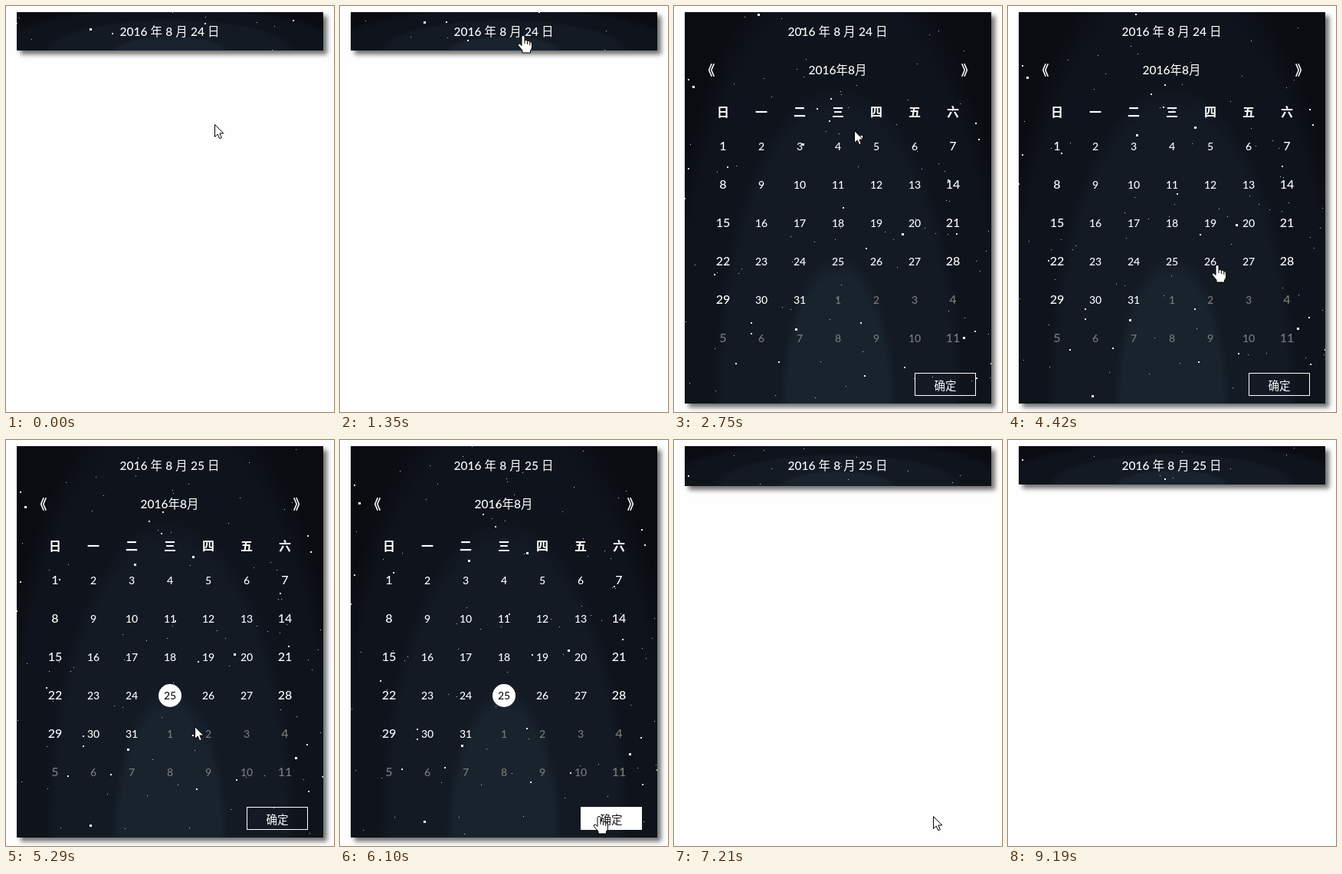
An HTML page with a canvas for the animation above (9.29 s loop, 428 by 529 pixels).

```html
<!DOCTYPE html>
<html lang="zh-CN">
<head>
<meta charset="utf-8">
<title>日历</title>
<style>
  html, body { margin: 0; width: 100%; height: 100%; overflow: hidden; background: #fefefe; }
  canvas { display: block; }
</style>
</head>
<body>
<canvas id="stage" width="428" height="529"></canvas>
<script>
const ctx = document.getElementById('stage').getContext('2d');
const LOOP = 9290;
const PANEL = { x: 14, y: 8, w: 400, closed: 50, open: 510 };
const BUTTON = { x: 314, y: 478, w: 80, h: 30 };
const OPEN_AT = 2000, PICK_AT = 4950, CLOSE_AT = 6680, SLIDE = 580;
const FAMILY = "Lato, 'Noto Sans CJK SC', 'Noto Sans CJK', sans-serif";

let seed = 11;
const random = () => (seed = seed * 16807 % 2147483647) / 2147483647;
const scatter = (count, depth) => Array.from({ length: count }, () =>
  [Math.round(PANEL.x + random() * PANEL.w), PANEL.y + random() * depth]);

// Star layers rise at different speeds (px/s); larger dots are slower.
const layers = [
  { size: 3, speed: 6.9, alpha: 1,
    dots: [[25, 124], [168, 199], [159, 440], [298, 316], [378, 451], [244, 189], [110, 30], [110, 539]] },
  { size: 2, speed: 10.9, alpha: .95, dots: scatter(28, 610) },
  { size: 1, speed: 18.2, alpha: .8, dots: scatter(105, 680) }
];

// Pointer stops: time, x, y.
const path = [
  [0, 272, 154], [1300, 240, 38], [2220, 240, 38], [2750, 235, 162], [4420, 274, 337],
  [4900, 214, 333], [6080, 339, 490], [7700, 338, 490], [8450, 352, 532]
];
const arrowShape = new Path2D('M.5 .5V16.5L4.2 13L6.7 18.7L9.3 17.6L6.9 12H11.8Z');
const handShape = new Path2D('M-2 1.5Q0-1 2 1.5V7Q4 5.5 5.5 7.7Q7.5 6.5 8.7 8.7' +
  'Q11.5 8 11.5 11V16Q11 19 9.5 20V23H-1V20L-6.5 13.5Q-7.5 10.5-4.5 11L-2 13.5Z');

// CSS "ease" timing: cubic-bezier(.25, .1, .25, 1).
function ease(x) {
  if (x <= 0) return 0;
  if (x >= 1) return 1;
  let low = 0, high = 1, s;
  for (let i = 0; i < 20; i++) {
    s = (low + high) / 2;
    if (.75 * s * (1 - s) + s ** 3 < x) low = s; else high = s;
  }
  return .3 * s * (1 - s) ** 2 + 3 * s * s * (1 - s) + s ** 3;
}

function panelHeight(t) {
  const shown = ease((t - OPEN_AT) / SLIDE) - ease((t - CLOSE_AT) / SLIDE);
  return PANEL.closed + (PANEL.open - PANEL.closed) * shown;
}

function pointerAt(t) {
  const next = path.findIndex(p => p[0] > t);
  if (next < 0) return path[path.length - 1].slice(1);
  const [t0, x0, y0] = path[next - 1], [t1, x1, y1] = path[next];
  const u = (t - t0) / (t1 - t0), k = u * u * (3 - 2 * u);
  return [Math.round(x0 + (x1 - x0) * k), Math.round(y0 + (y1 - y0) * k)];
}

const inBox = (x, y, b) => x >= b.x && x < b.x + b.w && y >= b.y && y < b.y + b.h;

function isClickable(x, y, height) {
  if (y > PANEL.y + height) return false;
  if (y < PANEL.y + PANEL.closed || inBox(x, y, BUTTON)) return true;
  const col = Math.round((x - 64) / 50), row = Math.round((y - 183) / 50);
  return col >= 0 && col < 7 && row >= 0 && row < 6 &&
    Math.hypot(x - 64 - col * 50, y - 183 - row * 50) < 15;
}

function text(str, x, y, { size = 15.5, color = '#fff', align = 'center', weight = 500, gap = 0 } = {}) {
  ctx.font = `${weight} ${size}px ${FAMILY}`;
  ctx.fillStyle = color;
  ctx.textAlign = align;
  ctx.wordSpacing = gap + 'px';
  ctx.fillText(str, x, y);
}

function drawSky(height) {
  const { x, y, w } = PANEL;
  ctx.save();
  ctx.shadowColor = '#707070';
  ctx.shadowBlur = 6;
  ctx.shadowOffsetX = ctx.shadowOffsetY = 5;
  ctx.fillStyle = '#0a0c11';
  ctx.fillRect(x, y, w, height);
  ctx.restore();

  // Banded elliptical glow that stretches with the panel.
  ctx.save();
  ctx.translate(x + w / 2, y + height);
  ctx.scale(1, height / (w / 2));
  const glow = ctx.createRadialGradient(0, 0, 0, 0, 0, w / 2 * Math.SQRT2);
  const bands = [[0, .23, '#18232e'], [.27, .53, '#131a24'], [.58, .75, '#0f131b'], [.84, 1, '#0a0c12']];
  for (const [from, to, color] of bands) {
    glow.addColorStop(from, color);
    glow.addColorStop(to, color);
  }
  ctx.fillStyle = glow;
  ctx.fillRect(-w / 2, -w / 2, w, w / 2);
  ctx.restore();
}

function drawStars(t) {
  for (const { size, speed, alpha, dots } of layers) {
    ctx.fillStyle = `rgba(255,255,255,${alpha})`;
    const half = Math.floor(size / 2);
    for (const [x, y] of dots) {
      ctx.fillRect(x - half, Math.round(y - speed * t / 1000) - half, size, size);
    }
  }
}

function drawCalendar(t, hovered) {
  const picked = t >= PICK_AT;
  text(`2016 年 8 月 ${picked ? 25 : 24} 日`, 213.5, 39, { gap: .2 });
  text('2016年8月', 213.5, 89);
  text('《', 53.5, 89.5, { size: 18, align: 'right', weight: 700 });
  text('》', 374.5, 89.5, { size: 18, align: 'left', weight: 700 });
  [...'日一二三四五六'].forEach((day, i) => text(day, 64 + i * 50, 144, { size: 16, weight: 700 }));

  for (let i = 0; i < 42; i++) {
    const col = i % 7, x = 64 + col * 50, y = 183 + Math.floor(i / 7) * 50;
    const selected = picked && i === 24;
    if (selected) {
      ctx.fillStyle = '#fff';
      ctx.beginPath();
      ctx.arc(x, y, 15, 0, Math.PI * 2);
      ctx.fill();
    }
    const weekend = col === 0 || col === 6;
    text(i % 31 + 1, x, y + 5, {
      size: weekend ? 16 : 14,
      color: selected ? '#111' : i < 31 ? '#fff' : '#7c7c7c'
    });
  }

  const { x, y, w, h } = BUTTON;
  ctx.fillStyle = ctx.strokeStyle = '#fff';
  ctx.lineWidth = 1;
  if (hovered) ctx.fillRect(x, y, w, h);
  else ctx.strokeRect(x + .5, y + .5, w - 1, h - 1);
  text('确定', 354, 500, { size: 14.5, weight: 400, color: hovered ? '#111' : '#fff' });
}

function drawPointer(x, y, hand) {
  const shape = hand ? handShape : arrowShape;
  ctx.save();
  ctx.translate(hand ? x - 1 : x, y);
  ctx.fillStyle = '#fff';
  ctx.strokeStyle = '#000';
  ctx.lineWidth = 1;
  ctx.fill(shape);
  ctx.stroke(shape);
  if (hand) {
    ctx.beginPath();
    for (let finger = 0; finger < 3; finger++) {
      ctx.moveTo(2 + finger * 3.4, 7 + finger);
      ctx.lineTo(2 + finger * 3.4, 11 + finger);
    }
    ctx.stroke();
  }
  ctx.restore();
}

function draw(now) {
  const t = now % LOOP;
  const height = panelHeight(t);
  const [x, y] = pointerAt(t);
  ctx.fillStyle = '#fefefe';
  ctx.fillRect(0, 0, 428, 529);
  drawSky(height);
  ctx.save();
  ctx.beginPath();
  ctx.rect(PANEL.x, PANEL.y, PANEL.w, height);
  ctx.clip();
  drawStars(t);
  drawCalendar(t, inBox(x, y, BUTTON));
  ctx.restore();
  drawPointer(x, y, isClickable(x, y, height));
}

const start = performance.now();
function tick() {
  draw(performance.now() - start);
  requestAnimationFrame(tick);
}
tick();
</script>
</body>
</html>
```
